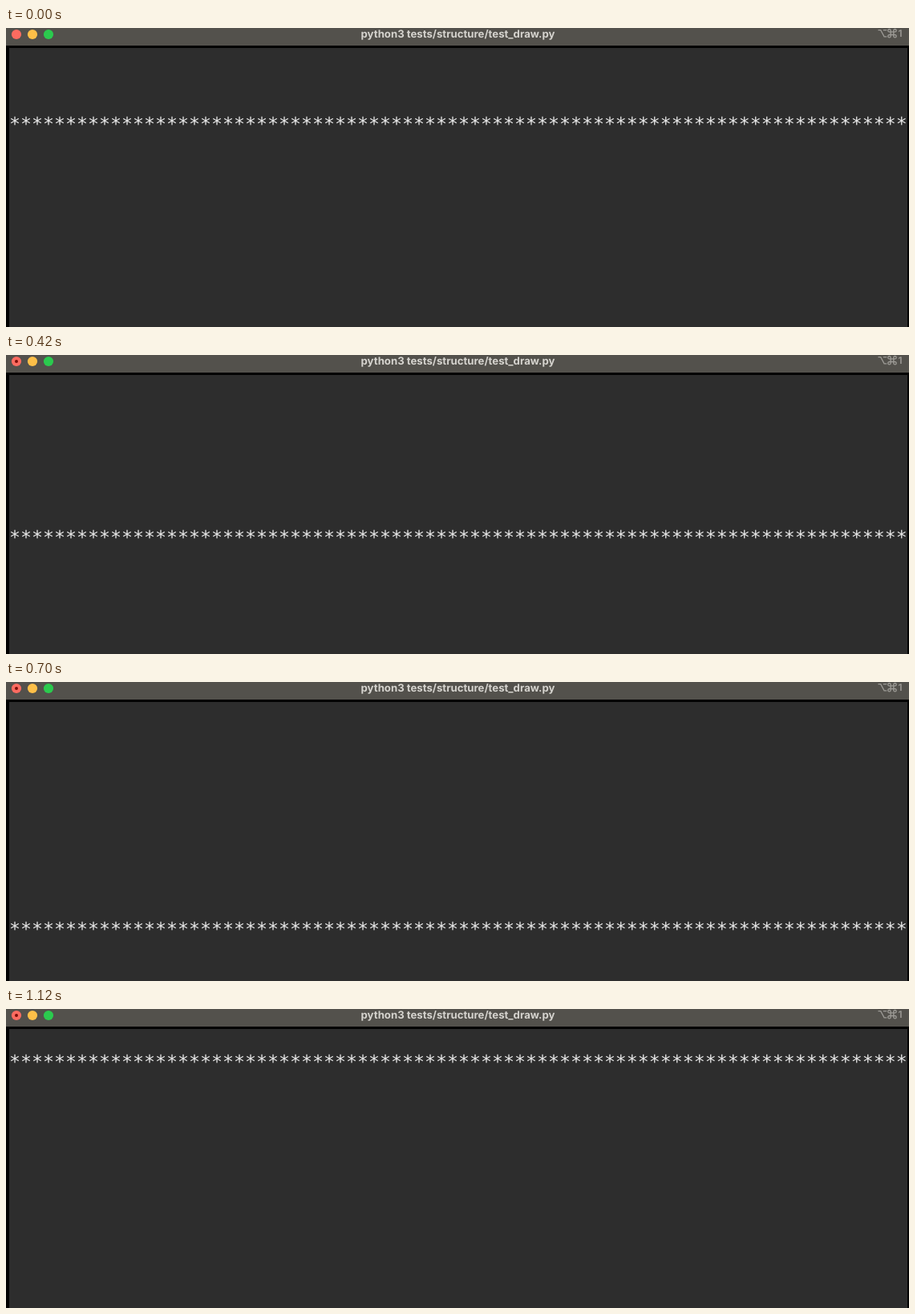
An HTML page that plays this animation: 1126 px wide and 374 px high, repeating every 1.19 s.

```html
<!DOCTYPE html>
<html lang="en">
<head>
<meta charset="utf-8">
<title>Terminal</title>
<style>
  html, body { margin: 0; width: 100%; height: 100%; overflow: hidden; background: #000; }
  svg { display: block; width: 1126px; height: 374px; }
  text { text-rendering: geometricPrecision; white-space: pre; }
  .title { font: 700 13.2px Inter, sans-serif; fill: #d5d3ce; text-anchor: middle; }
  .hint { font: 600 12px Inter, sans-serif; fill: #9d9b96; }
  .keys { fill: none; stroke: #9d9b96; stroke-width: 1.3; }
  .stars { font: 23.254px "DejaVu Sans Mono", monospace; fill: #e6e6e6; }
</style>
</head>
<body>
<svg viewBox="0 0 1126 374">
  <rect width="1126" height="374" fill="#000"/>
  <rect width="1126" height="22" fill="#53514c"/>
  <rect x="4" y="25" width="1120" height="349" fill="#2d2d2d"/>

  <circle cx="13" cy="8" r="6.1" fill="#fc6b60"/>
  <circle id="dot" cx="13" cy="8" r="2" fill="#7c0f0a"/>
  <circle cx="33" cy="8" r="6.1" fill="#fdbf48"/>
  <circle cx="53" cy="8" r="6.1" fill="#2bca4e"/>

  <text class="title" x="563.5" y="12">python3 tests/structure/test_draw.py</text>

  <g class="keys">
    <path d="M1087.5 2.6h3.2l4.4 8.3h3.2M1093.8 2.6h4.5"/>
    <path id="command" transform="translate(1105 6.7)"/>
  </g>
  <text class="hint" x="1112.5" y="11">1</text>

  <text class="stars" id="stars" x="4"></text>
</svg>
<script>
  const STEP = 70, STEPS = 17;
  const ROWS = 13, PITCH = 27, TOP = 46.6;
  const START_ROW = 3.72, ROWS_PER_STEP = 0.65;
  const DOT_FROM = 3;

  const el = id => document.getElementById(id);
  const stars = el("stars"), dot = el("dot");

  // Inner square with a three-quarter loop at each corner
  function commandPath(half, r) {
    const loops = [[-1, -1], [1, -1], [1, 1], [-1, 1]].map(([sx, sy]) =>
      `M${sx * half} ${sy * half}h${sx * r}a${r} ${r} 0 1 ${sx * sy > 0 ? 1 : 0} ${-sx * r} ${sy * r}z`);
    return `M${-half} ${-half}h${2 * half}v${2 * half}h${-2 * half}z` + loops.join("");
  }

  function draw(ms) {
    const step = Math.floor(ms / STEP) % STEPS;
    const row = Math.floor(START_ROW + ROWS_PER_STEP * step) % ROWS;
    stars.setAttribute("y", TOP + PITCH * row);
    dot.setAttribute("visibility", step < DOT_FROM ? "hidden" : "visible");
  }

  el("command").setAttribute("d", commandPath(1.8, 1.7));
  stars.textContent = "*".repeat(80);

  const start = performance.now();
  function tick() {
    draw(performance.now() - start);
    requestAnimationFrame(tick);
  }
  draw(0);
  requestAnimationFrame(tick);
</script>
</body>
</html>
```
